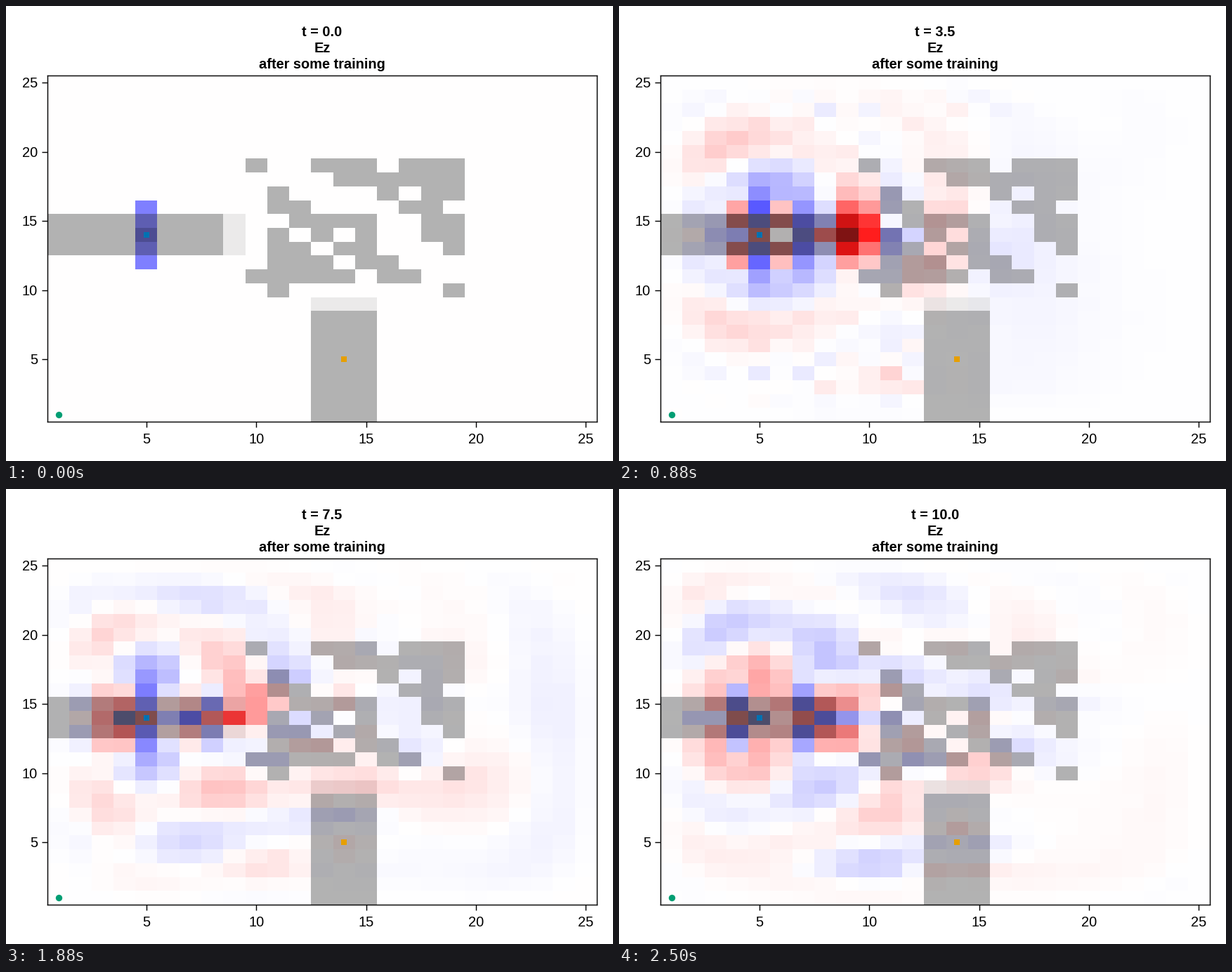
Animation of 864x648 px, one loop 2.56 s. Source, as a matplotlib script:

```python
import math

import matplotlib.pyplot as plt
import numpy as np
from matplotlib.animation import FuncAnimation

W, H = 864, 648
N = 25                # cells per side
TICKS = 256           # 10 ms each
TICKS_PER_FRAME = 6.25
FRAMES = 41
SUBSTEPS = 4          # solver steps per shown step of 0.25
DT = 0.25 / SUBSTEPS
LEFT, RIGHT, TOP, BOTTOM = 59, 841, 99.3, 591.7

# Squared phase advance per cell of a unit-frequency wave.
CLADDING, CORE = 1.12, 6.5
PORT_DENSITY = 0.26   # thin transition strip at the end of each guide


def density():
    """Two straight guides and the scattered design region between them."""
    g = np.zeros((N, N))
    g[12:15, :8] = g[:8, 12:15] = 1
    g[12:15, 8] = g[8, 12:15] = PORT_DENSITY
    runs = {
        19: [(10, 10), (13, 15), (17, 19)],
        18: [(14, 19)],
        17: [(11, 11), (16, 16), (18, 19)],
        16: [(11, 12), (17, 18)],
        15: [(12, 15), (18, 19)],
        14: [(11, 11), (13, 13), (15, 15), (18, 19)],
        13: [(11, 12), (14, 15), (19, 19)],
        12: [(11, 13), (15, 16)],
        11: [(10, 14), (16, 17)],
        10: [(11, 11), (19, 19)],
    }
    for y, spans in runs.items():
        for a, b in spans:
            g[y - 1, a - 1:b] = 1
    return g


def keep(pos):
    """Share of the field left after one step in the absorbing border."""
    depth = np.maximum(0, np.abs(pos - 13) - 9)
    return np.exp(-0.9 * depth ** 2 * DT)


def simulate(g):
    """Leapfrog wave solver; returns Ez at every shown step."""
    speed = (2 * math.sin(math.pi * DT)) ** 2 / (CLADDING + g * (CORE - CLADDING))
    cells, faces = keep(np.arange(1, N + 1)), keep(np.arange(N + 1) + 0.5)
    e, hx, hy = np.zeros((N, N)), np.zeros((N, N + 1)), np.zeros((N + 1, N))
    source = np.array([0.5, 0.82, 1.45, 0.82, 0.5])
    shown = []
    for n in range((FRAMES - 1) * SUBSTEPS + 1):
        hx = (hx + np.diff(np.pad(e, ((0, 0), (1, 1))), axis=1)) * faces
        hy = (hy + np.diff(np.pad(e, ((1, 1), (0, 0))), axis=0)) * faces[:, None]
        e = e + speed * (np.diff(hx, axis=1) + np.diff(hy, axis=0))
        e *= cells * cells[:, None]
        e[11:16, 4] -= source * math.cos(2 * math.pi * n * DT)
        if n % SUBSTEPS == 0:
            shown.append(e.copy())
    return shown


material = density()
fields = simulate(material)
cover = 0.6 * material[..., None]
seismic = plt.get_cmap("seismic", 1024)


def picture(e):
    rgb = seismic(np.clip((e + 2) / 4, 0, 1))[..., :3]
    return rgb * (1 - cover) + 0.5 * cover


plt.rcParams["font.family"] = "Liberation Sans"
fig = plt.figure(figsize=(W / 72, H / 72), dpi=72, facecolor="white")
ax = fig.add_axes([LEFT / W, 1 - BOTTOM / H, (RIGHT - LEFT) / W, (BOTTOM - TOP) / H])

image = ax.imshow(picture(fields[0]), origin="lower", aspect="auto",
                  interpolation="nearest", extent=(0.5, N + 0.5, 0.5, N + 0.5))
marks = range(5, 26, 5)
ax.set_xticks(marks)
ax.set_yticks(marks)
ax.tick_params(length=8, width=1.43, labelbottom=False, labelleft=False)
for side in ax.spines.values():
    side.set_linewidth(1.43)

for x, y, marker, size, color in [(5, 14, "s", 8, "#0072B2"),
                                  (14, 5, "s", 8, "#E69F00"),
                                  (1, 1, "o", 9.4, "#009E73")]:
    ax.plot(x, y, marker, ms=size, mew=0, color=color)


def label(x, y, text, **style):
    return fig.text(x / W, 1 - y / H, text, fontsize=20, va="baseline", **style)


for k in marks:
    label(LEFT + (k - 0.5) * (RIGHT - LEFT) / N, 623, str(k), ha="center")
    label(45, BOTTOM - (k - 0.5) * (BOTTOM - TOP) / N + 7, str(k), ha="right")

clock = label(450, 43, "t = 0.0", ha="center", weight="bold")
label(450, 66, "Ez", ha="center", weight="bold")
label(450, 89.3, "after some training", ha="center", weight="bold")


def update(tick):
    step = math.ceil((tick + 0.5) / TICKS_PER_FRAME) - 1
    image.set_data(picture(fields[step]))
    clock.set_text(f"t = {step / 4}")
    return image, clock


anim = FuncAnimation(fig, update, frames=TICKS, interval=10, repeat=True,
                     repeat_delay=0, init_func=lambda: update(0))
plt.show()
```
